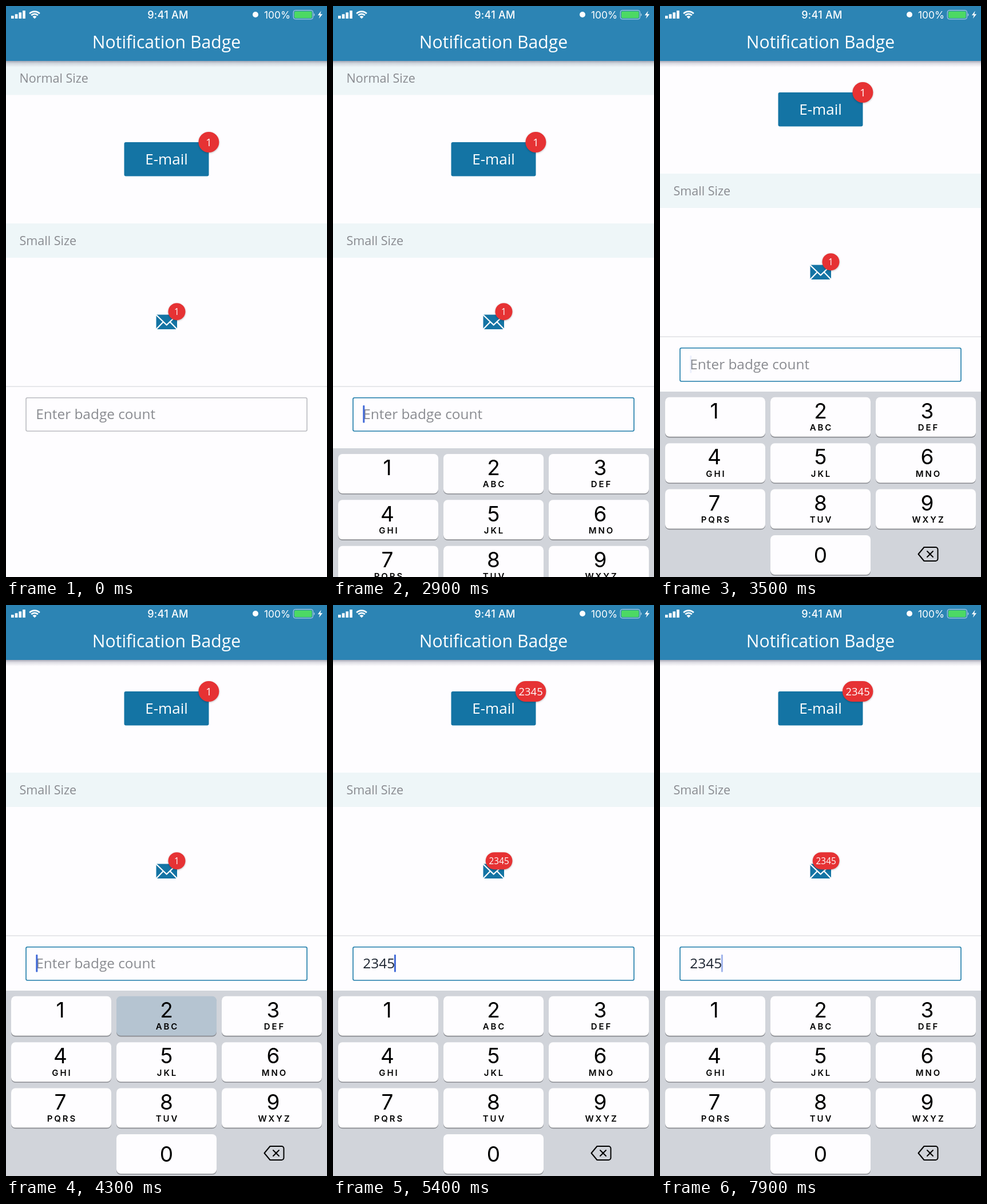
An HTML page that plays this animation: 561 px wide and 998 px high, repeating every 8 s.

```html
<!DOCTYPE html>
<html lang="en">
<head>
<meta charset="utf-8">
<title>Notification Badge</title>
<style>
  html, body { margin: 0; width: 100%; height: 100%; overflow: hidden; background: #fefdff; }
  svg { display: block; width: 561px; height: 998px; overflow: hidden; }
  text { font-family: "Open Sans", "Noto Sans", sans-serif; white-space: pre; }
  .ui, .ui text { font-family: Inter, Roboto, sans-serif; }
  .mid { text-anchor: middle; }
  .label { font-size: 21.5px; fill: #898b90; }
  .input { font-size: 24.4px; }
  .blue { fill: #1474a4; }
  .white { fill: #fff; }
  .badge { filter: drop-shadow(0 1.5px 1.5px rgba(0, 0, 0, .28)); }
  .badge rect { fill: #e63234; }
  .digit { font-size: 37px; }
  .letters { font-size: 15px; font-weight: 600; letter-spacing: 2.9px; }

  #page { animation: lift 8s infinite; }
  #keyboard { animation: slide 8s infinite; }
  #field { animation: focus 8s infinite step-end; }

  @keyframes lift {
    0%, 39.25% { transform: none; animation-timing-function: ease-in-out; }
    43%, 100% { transform: translateY(-87px); }
  }
  @keyframes slide {
    0%, 33% { transform: translateY(324px); animation-timing-function: cubic-bezier(.4, 0, .8, .8); }
    36.25% { transform: translateY(100px); animation-timing-function: ease-out; }
    38.75%, 100% { transform: none; }
  }
  @keyframes focus {
    0% { stroke: #bbbcc1; }
    32.5%, 100% { stroke: #1c7ba9; }
  }
</style>
</head>
<body>
<svg viewBox="0 0 561 998">
  <defs>
    <linearGradient id="shade" x2="0" y2="1">
      <stop offset="0" stop-color="#50506a" stop-opacity=".48"/>
      <stop offset=".4" stop-color="#50506a" stop-opacity=".18"/>
      <stop offset="1" stop-color="#50506a" stop-opacity="0"/>
    </linearGradient>
  </defs>
  <rect width="561" height="998" fill="#fefdff"/>

  <g id="page">
    <rect y="95" width="561" height="60.5" fill="#eef6f8"/>
    <text class="label" x="23.5" y="133.5">Normal Size</text>
    <rect class="blue" x="206.5" y="238" width="148" height="59.5" rx="3"/>
    <text class="white mid" x="280.5" y="276.5" font-size="26">E-mail</text>
    <g class="badge" id="big"><rect/><text class="white mid"/></g>

    <rect y="380" width="561" height="60" fill="#eef6f8"/>
    <text class="label" x="23.5" y="417.5">Small Size</text>
    <rect class="blue" x="262.5" y="539.5" width="36.5" height="25.5"/>
    <path d="M262 539.5L280.7 557.5 299.5 539.5M262 565.5L275 552M299.5 565.5L286.5 552"
      fill="none" stroke="#fff" stroke-width="2.2"/>
    <g class="badge" id="small"><rect/><text class="white mid"/></g>

    <rect y="664.3" width="561" height="1.5" fill="#dfe0e4"/>
    <rect id="field" x="35" y="684.7" width="491" height="58.3" rx="2.5" fill="#fefdff" stroke-width="1.6"/>
    <text class="input" id="value" x="52.3" y="721.5"></text>
    <rect id="caret" y="698" width="3" height="30.5" rx="1" fill="#4069d8"/>
  </g>

  <rect y="96" width="561" height="11" fill="url(#shade)"/>
  <rect width="561" height="96" fill="#2c84b4"/>
  <text class="white mid" x="280.5" y="73.5" font-size="30.2" font-weight="500">Notification Badge</text>

  <g class="white ui">
    <path d="M9 17h4.7v5H9zM15.7 14.2h4.7V22h-4.7zM22.4 11.2h4.7V22h-4.7zM29.1 8h4.7v14h-4.7z"/>
    <path d="M41.2 13.2A12.5 12.5 0 0 1 58.8 13.2M44.3 16.3A8 8 0 0 1 55.7 16.3"
      fill="none" stroke="#fff" stroke-width="2.8"/>
    <path d="M50 22.3L46.5 18.8A5 5 0 0 1 53.5 18.8Z"/>
    <text class="mid" x="283" y="21.7" font-size="18" font-weight="500" letter-spacing=".3">9:41 AM</text>
    <circle cx="436" cy="15" r="5"/>
    <text class="mid" x="474" y="21.7" font-size="17.4">100%</text>
    <rect x="502.2" y="7.5" width="34.3" height="15.5" rx="3.5" fill="none" stroke="#fff" stroke-opacity=".7"/>
    <rect x="504" y="9.3" width="30.7" height="12" rx="2" fill="#4cd964"/>
    <path d="M538 12.5a3.5 3.5 0 0 1 0 5.5z" opacity=".7"/>
    <path d="M550.8 8.5L544.8 16.2H548.6L546.8 22 553.2 14.2H549.2Z"/>
  </g>

  <g id="keyboard" class="ui">
    <rect y="674" width="561" height="324" fill="#d1d4da"/>
    <g id="keys"></g>
    <path d="M461.5 946H481.5a4 4 0 0 1 4 4V966a4 4 0 0 1-4 4H461.5L451.5 958ZM467 953l10 10M477 953l-10 10"
      fill="none" stroke="#000" stroke-width="2" stroke-linejoin="round" stroke-linecap="round"/>
  </g>
</svg>

<script>
const LOOP = 8000, FOCUS = 2600, ENTRY = "2345";
const FIRST_PRESS = 4200, PRESS = 200, GAP = 300;
const LETTERS = ["", "", "ABC", "DEF", "GHI", "JKL", "MNO", "PQRS", "TUV", "WXYZ"];
const get = id => document.getElementById(id);
const caps = {};

function add(parent, tag, attrs, text = "") {
  const el = document.createElementNS("http://www.w3.org/2000/svg", tag);
  for (const name in attrs) el.setAttribute(name, attrs[name]);
  el.textContent = text;
  return parent.appendChild(el);
}

function addKey(digit) {
  const slot = digit ? digit - 1 : 10;
  const x = 9 + slot % 3 * 184, y = 683.8 + Math.floor(slot / 3) * 80.4;
  const box = { x, width: 175, height: 69, rx: 7.5 };
  add(get("keys"), "rect", { ...box, y: y + 1.6, fill: "#898b90" });
  caps[digit] = add(get("keys"), "rect", { ...box, y });
  add(get("keys"), "text", { class: "digit mid", x: x + (digit % 3 === 1 ? 86 : digit && digit % 3 === 0 ? 90 : 87.5), y: y + (digit ? 37.2 : 47.7) }, digit);
  add(get("keys"), "text", { class: "letters mid", x: x + (digit % 3 === 0 ? 92.5 : 89), y: y + 58.4 }, LETTERS[digit]);
}

// Badges grow to the left from a fixed right edge.
function setBadge(id, right, y, height, size, text) {
  const [box, label] = get(id).children;
  const width = Math.max(height, text.length * size * .567 + 11.8);
  const attrs = { x: right - width, y, width, height, rx: height / 2 };
  for (const name in attrs) box.setAttribute(name, attrs[name]);
  label.setAttribute("x", right - width / 2);
  label.setAttribute("y", y + height / 2 + size * .36);
  label.setAttribute("font-size", size);
  label.textContent = text;
}

function blink(ms) {
  const p = ms % 1000;
  if (p <= 500) return 1;
  if (p < 700) return (700 - p) / 200;
  return Math.max(0, (p - 850) / 150);
}

function draw(now) {
  const t = now % LOOP;
  const sinceFirst = t - FIRST_PRESS - PRESS;
  const count = Math.min(ENTRY.length, Math.max(0, Math.floor(sinceFirst / GAP) + 1));
  const typed = ENTRY.slice(0, count);

  [...ENTRY].forEach((digit, i) => {
    const held = t - FIRST_PRESS - i * GAP;
    caps[digit].setAttribute("fill", held >= 0 && held < PRESS ? "#b5c4d1" : "#fefdff");
  });

  setBadge("big", 372.4, 220, 36, 18.4, typed || "1");
  setBadge("small", 313.5, 519.2, 30, 15.4, typed || "1");

  get("value").textContent = typed || "Enter badge count";
  get("value").setAttribute("fill", typed ? "#1c2430" : "#898b90");

  const reset = count ? FIRST_PRESS + PRESS + (count - 1) * GAP : FOCUS + 220;
  get("caret").setAttribute("x", 52.3 + count * 13.65);
  get("caret").setAttribute("opacity", t < FOCUS ? 0 : blink(Math.max(0, t - reset)));
}

for (let digit = 0; digit < 10; digit++) {
  addKey(digit);
  caps[digit].setAttribute("fill", "#fefdff");
}

function frame(now) {
  draw(now);
  requestAnimationFrame(frame);
}
draw(0);
requestAnimationFrame(frame);
</script>
</body>
</html>
```
